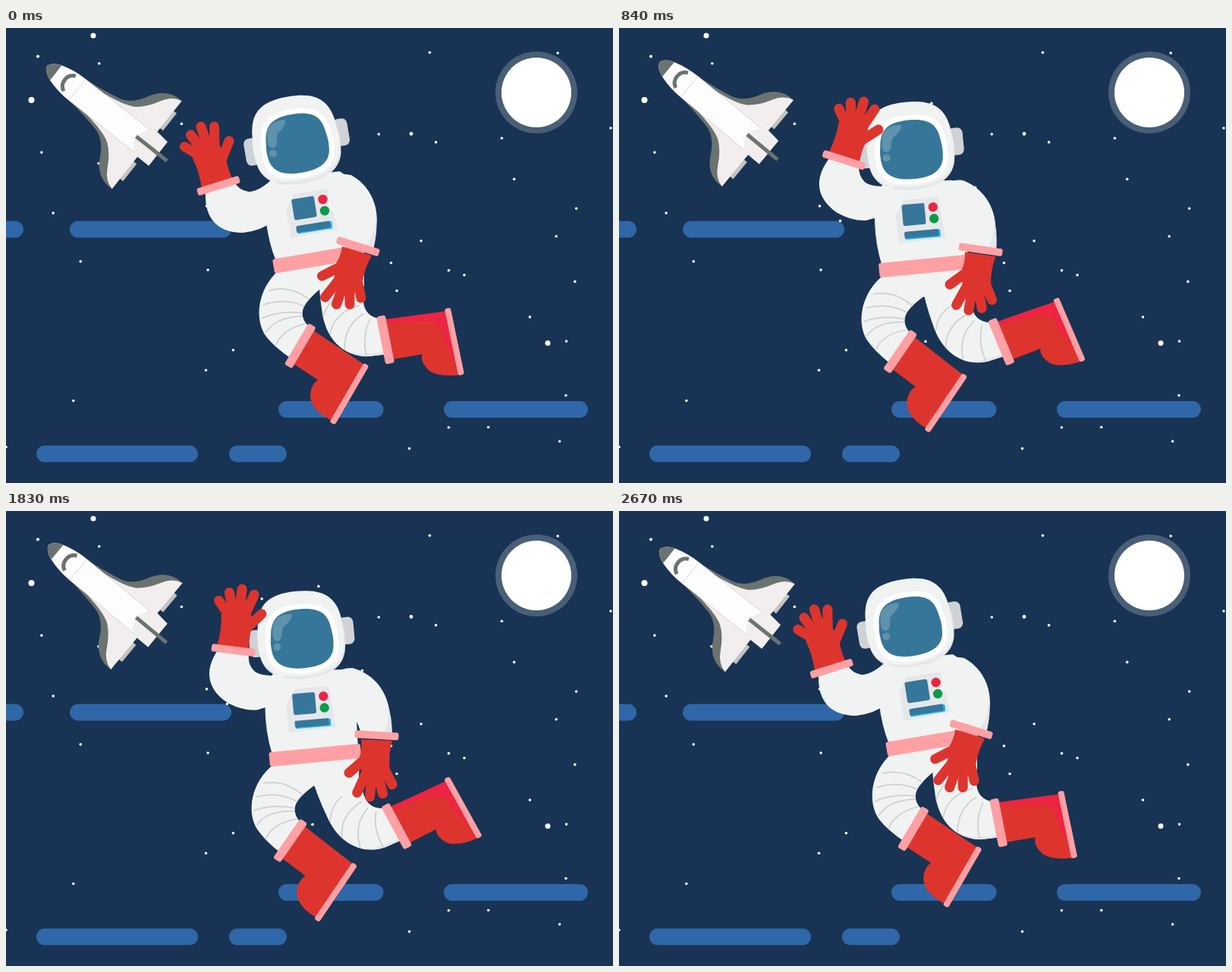
Animation, 800 px wide and 600 px high, one loop 2700 ms. Source, as an HTML page:

```html
<!DOCTYPE html>
<html lang="en">
<head>
<meta charset="utf-8">
<title>Waving astronaut</title>
<style>
  html, body { margin: 0; width: 100%; height: 100%; overflow: hidden; background: #183353; }
  svg { display: block; width: 100vw; height: 100vh; }
  .suit { fill: #f1f3f2; }
  .shade { fill: #e5e7ea; }
  .red { fill: #dd352e; }
  .fingers { fill: none; stroke: #dd352e; stroke-width: 13; stroke-linecap: round; }
  .pink { fill: #ffa0a5; }
  .glass { fill: #367699; }
  .fold { fill: none; stroke: #c9cccd; stroke-width: 1.5; }
  .dark { fill: #6b7370; }
  .beam { fill: none; stroke: #6b7370; stroke-width: 5; }
  .wing { fill: #f1eeed; }
  .flap { fill: #c0c5c3; }
</style>
</head>
<body>
<svg viewBox="0 0 800 600">
  <defs>
    <path id="blob" d="M0-1C.68-1 .92-.75 .97-.2Q1.03 .12 .97 .45C.88 .83 .55 1 0 1C-.55 1-.88 .83-.97 .45Q-1.03 .12-.97-.2C-.92-.75-.68-1 0-1Z"/>
    <g id="sideWing">
      <path class="dark" d="M-4 17Q30 21 52 26Q68 31 78 50Q91 76 117 74L115 30L60 16Z"/>
      <path class="flap" d="M114 28H122V57H114Z"/>
      <path class="wing" d="M22 17Q60 21 74 30Q86 39 95 56Q103 71 117 74V17Z"/>
    </g>
  </defs>
  <rect width="800" height="600" fill="#183353"/>
  <path d="M-20 265.500H12M95 265.500H286M370 503H486.500M588 503H756M51 561.500H242M305 561.500H359" stroke="#2f67a8" stroke-width="22" stroke-linecap="round"/>
  <g id="stars" fill="#fff">
    <circle cx="115" cy="10" r="3.500"/>
    <circle cx="33.500" cy="95" r="4"/>
    <circle cx="714" cy="415.500" r="3.500"/>
    <circle cx="534" cy="139.500" r="2.400"/>
    <circle cx="42" cy="37.500" r="2.100"/>
  </g>
  <circle cx="699" cy="85" r="54" fill="#495e77"/>
  <circle cx="699" cy="85" r="46" fill="#fff"/>

  <g id="ship">
    <g transform="translate(94 81.500) rotate(38.400)">
      <use href="#sideWing"/>
      <use href="#sideWing" transform="scale(1 -1)"/>
      <path fill="#fdfdfd" d="M-51 0Q-49-8-36-12.500Q-18-18 0-18H111V18H0Q-18 18-36 12.500Q-49 8-51 0Z"/>
      <path d="M111-18H0V18H111" fill="none" stroke="#aaa" stroke-width=".6" stroke-dasharray="2 1"/>
      <path class="wing" d="M98 0Q104-21 118-22L136-20V20H118Q104 20 98 0Z"/>
      <path class="dark" d="M-51 0Q-49-8-36-12.500V12.500Q-49 8-51 0Z"/>
      <path class="beam" d="M-13 12.500A14 14 0 0 1-13-13M99 0H151"/>
    </g>
  </g>

  <g id="body">
    <path class="suit" d="M410 300L413 345H440L472 340L471 295Z"/>
    <g id="legR">
      <path class="suit" d="M412 310Q412 345 416 370C420 410 445 434 478 433L504 430L494 384Q472 380 471 360L472 310Z"/>
      <path class="shade" d="M452 427Q464 434 478 433L504 430V426Q475 433 452 427Z"/>
      <path class="fold" d="M418 380Q424 360 443 352M427 404Q432 375 466 366M446 424Q446 392 471 377M475 432Q469 405 480 384"/>
      <path fill="#ed2442" d="M500 384L583 373L600 457Q573 461 558 452Q545 440 549 430L508 437Z"/>
      <path class="red" d="M500 389L555 387Q574 389 575 404Q582 425 598 445L600 457Q573 461 558 452Q545 440 549 430L508 437Z"/>
      <rect class="pink" x="494" y="379" width="12" height="64" rx="3" transform="rotate(-11 500 411)"/>
      <rect class="pink" x="587" y="368.500" width="8" height="90" rx="3" transform="rotate(-11.700 591 413.500)"/>
    </g>

    <path class="suit" d="M359 320C331 345 327 385 343 407Q354 421 376 436L402 396Q389 386 391 373Q393 362 413 345L430 305Z"/>
    <path class="fold" d="M347 346Q375 339 400 358M339 365Q367 355 393 367M337 383Q360 372 391 376M342 402Q355 381 391 380M355 420Q362 398 394 390"/>
    <path class="red" d="M404 398L474 445L430 518Q402 505 401 484Q402 470 411 464L376 441Z"/>
    <rect class="pink" x="382" y="387.500" width="11.500" height="63" rx="3" transform="rotate(30.500 387.700 419)"/>
    <rect class="pink" x="448.500" y="437.500" width="8" height="90" rx="3" transform="rotate(30 452.500 482.500)"/>

    <path class="suit" d="M341 225Q341 270 356 308L468 289Q464 265 463 245Q460 200 440 189L350 198Z"/>
    <rect class="pink" x="351" y="305" width="121" height="19" rx="3" transform="rotate(-9.600 351 305)"/>
    <path class="shade" d="M369 240L379 219L423 212L437 265L376 277Z"/>
    <rect class="glass" x="378" y="223.500" width="30" height="28" rx="2.500" transform="rotate(-9 393 237.500)"/>
    <circle cx="417.500" cy="226" r="6.200" fill="#ed2442"/>
    <circle cx="420" cy="241" r="6.200" fill="#0c9b48"/>
    <g transform="rotate(-9 406 262.500)">
      <rect x="383" y="258" width="47" height="10" rx="2" fill="#1cb5f0"/>
      <rect class="glass" x="382.500" y="257.500" width="45" height="9" rx="2"/>
    </g>

    <g id="armR">
      <path class="suit" d="M425 196Q440 190 455 194C480 208 492 235 488 262L484 294L444 282Q446 268 438 250L425 235Z"/>
      <path class="shade" d="M488 248Q490 270 484 292L473 288Q486 274 488 248Z"/>
      <path class="red" d="M443 288Q441 305 430 317L433 326L432 338L440 347H464L470 335Q472 318 482 300Z"/>
      <path class="fingers" d="M436 317L416.500 327M438 333L420.500 355M444 340L435.500 364.500M453 340V364.500M463 333L468 356"/>
      <rect class="pink" x="435" y="283" width="58" height="10" rx="3" transform="rotate(17.500 464 288)"/>
    </g>

    <g transform="translate(382 146.500) rotate(-9.500)">
      <rect x="-69" y="-11" width="20" height="36" rx="7" fill="#d0d2d6"/>
      <rect x="50" y="-17" width="20" height="36" rx="7" fill="#d0d2d6"/>
      <use href="#blob" class="shade" transform="translate(0 1.500) scale(57.500)"/>
      <use href="#blob" class="suit" transform="translate(-.8 -1) scale(57 56)"/>
      <use href="#blob" fill="#fff" transform="translate(.5 6) scale(48 45.500)"/>
      <use href="#blob" class="glass" transform="translate(.5 6) scale(41.300 39)"/>
    </g>
    <path fill="#5f93ad" d="M368 121Q346 122 344 140L345 152Q347 158 352 158Q357 157 357 150Q355 140 362 135Q370 126 368 121Z"/>
    <circle cx="352" cy="165.500" r="5" fill="#5f93ad"/>

    <g id="armL">
      <path class="suit" d="M263 215C261 250 278 270 312 270Q335 268 350 256L375 225L352 198Q335 215 320 216Q307 214 301 203Z"/>
      <g id="handL">
        <path class="red" d="M258 212Q255 190 246 172L252 152L268 149L281 154L284 160Q291 168 291 178Q294 190 299 200Z"/>
        <path class="fingers" d="M258 170L235.500 156.500M260 163L243.500 141M266 158L257 130M275 158L274.500 130M284 174L294 149"/>
        <rect class="pink" x="251" y="203" width="58" height="10" rx="3" transform="rotate(-17.500 280 208)"/>
      </g>
    </g>
  </g>
</svg>
<script>
const LOOP = 2700;
const STAR_COUNT = 45;
const $ = id => document.getElementById(id);

let seed = 7;
const random = () => (seed = seed * 16807 % 2147483647) / 2147483647;
for (let i = 0; i < STAR_COUNT; i++) {
  const x = 800 * random(), y = 600 * random();
  $('stars').insertAdjacentHTML('beforeend', `<circle cx="${x}" cy="${y}" r="1.8"/>`);
}

const ease = p => (1 - Math.cos(Math.PI * p)) / 2;
// Eases from 0 up to 1 at the peak time, then back to 0 at the end of the loop
const rise = (t, peak) => ease(t < peak ? t / peak : (LOOP - t) / (LOOP - peak));

function pose(id, angle, cx, cy, x = 0, y = 0) {
  $(id).setAttribute('transform', `translate(${x} ${y}) rotate(${angle} ${cx} ${cy})`);
}

function draw(t) {
  const sway = rise(t, LOOP / 2);
  const drift = Math.sin(2 * Math.PI * t / LOOP);
  const wave = ease(4 * t / LOOP);
  const secondWave = t > LOOP / 2;

  pose('ship', 1.7 * sway, 55, 48, sway - 1.4 * drift, -7 * sway);
  pose('body', 5.8 * sway, 417.5, 226, 1.3 * sway - 2.8 * wave - 2.4 * drift, 19.7 * rise(t, 1650));
  pose('armL', 36.4 * wave, 352, 219);
  pose('handL', secondWave ? -11.2 * wave : 0, 280, 208);
  pose('armR', -22.3 * rise(t, 1500), 429, 196);
  pose('legR', -26 * rise(t, 1500), 457.4, 331.3);
}

const start = performance.now();
function frame() {
  draw((performance.now() - start) % LOOP);
  requestAnimationFrame(frame);
}
frame();
</script>
</body>
</html>
```
